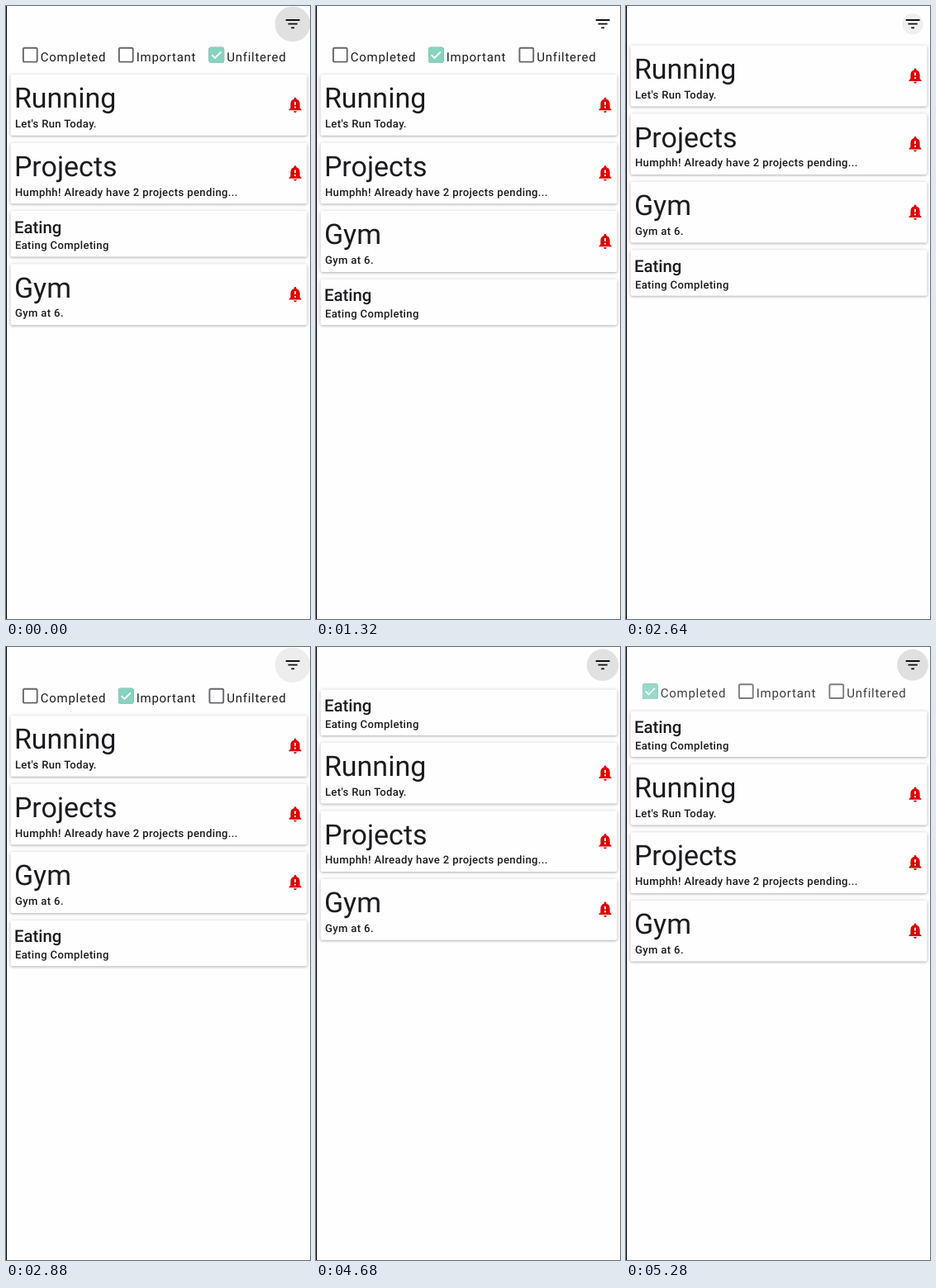
Write an HTML page that moves like this. It is 368 by 742 pixels and loops after 5.4 s.

```html
<!DOCTYPE html>
<html lang="en">
<head>
<meta charset="utf-8">
<title>Task list filters</title>
<style>
  html, body { margin: 0; width: 100%; height: 100%; overflow: hidden; background: #fefefe; }
  svg { display: block; }
  text { font-family: Roboto, sans-serif; fill: #1c1b1f; text-rendering: geometricPrecision; }
  .title { font-size: 34px; }
  .done { font-size: 20.4px; font-weight: 500; }
  .note { font-size: 13.1px; font-weight: 500; letter-spacing: .36px; }
  .option { font-size: 15px; letter-spacing: .74px; }
  .card { fill: #fefefe; filter: drop-shadow(0 1px 1.5px rgba(0,0,0,.27)) drop-shadow(0 0 2.5px rgba(0,0,0,.09)); }
  .bell { fill: #dc0000; }
  .box { fill: none; stroke: #67666a; stroke-width: 1.9; }
  .fill { fill: #86d3c0; }
  .tick { fill: none; stroke: #fff; stroke-width: 1.9; }
</style>
</head>
<body>
<svg id="stage" width="368" height="742" viewBox="0 0 368 742">
  <defs>
    <clipPath id="rowClip"><rect x="0" y="44" width="368" height="36"/></clipPath>
    <clipPath id="listClip"><rect x="1" y="79" width="367" height="311.3"/></clipPath>
  </defs>
  <rect width="368" height="742" fill="#fefefe"/>
  <g clip-path="url(#rowClip)"><g id="row"></g></g>
  <g id="list" clip-path="url(#listClip)"></g>
  <path transform="translate(335.9 10.4) scale(.9375)" fill="#111"
    d="M10 18h4v-2h-4zM3 6v2h18V6zM6 13h12v-2H6z"/>
  <g id="ripples"></g>
  <rect width="1" height="742"/>
</svg>
<script>
const LOOP = 5400, STEP = 120, ROW_HEIGHT = 35.3;
const PICK_IMPORTANT = 1000, PICK_COMPLETED = 3760;
const BELL = 'M18 16v-5c0-3.07-1.64-5.64-4.5-6.32V4c0-.83-.67-1.5-1.5-1.5s-1.5.67-1.5 1.5v.68C7.63 5.36 6 7.92 6 11v5l-2 2v1h16v-1zm-5 0h-2v-2h2zm0-4h-2V8h2zm-1 10c1.1 0 2-.9 2-2h-4c0 1.1.89 2 2 2z';

const byId = id => document.getElementById(id);
const clamp = v => Math.min(1, Math.max(0, v));
const smooth = u => u * u * (3 - 2 * u);

function add(parent, tag, attrs, text) {
  const el = document.createElementNS(parent.namespaceURI, tag);
  for (const key in attrs) el.setAttribute(key, attrs[key]);
  if (text) el.textContent = text;
  return parent.appendChild(el);
}

function makeCard(title, note, done) {
  const height = done ? 55.5 : 73.8;
  const el = add(byId('list'), 'g');
  add(el, 'rect', { class: 'card', x: 5.5, y: 0, width: 359, height, rx: 2 });
  add(el, 'text', { class: done ? 'done' : 'title', x: 9.9, y: done ? 26.6 : 40.3 }, title);
  add(el, 'text', { class: 'note', x: 10.9, y: done ? 46.2 : 64 }, note);
  if (!done) add(el, 'path', { class: 'bell', d: BELL, transform: 'translate(338.8 25.4) scale(.9375)' });
  return { el, pitch: height + 8.75 };
}

function makeOption(label, x) {
  const el = add(byId('row'), 'g', { transform: `translate(${x} 59.2)` });
  add(el, 'rect', { class: 'box', x: -8.4, y: -8.4, width: 16.8, height: 16.8, rx: 1.6 });
  const mark = add(el, 'g');
  add(mark, 'rect', { class: 'fill', x: -9.35, y: -9.35, width: 18.7, height: 18.7, rx: 2 });
  add(mark, 'path', { class: 'tick', d: 'M-5.6 0L-1.9 3.7L5.6 -3.7' });
  add(el, 'text', { class: 'option', x: 12.4, y: 7.7 }, label);
  return mark;
}

const running = makeCard('Running', "Let's Run Today.");
const projects = makeCard('Projects', 'Humphh! Already have 2 projects pending...');
const eating = makeCard('Eating', 'Eating Completing', true);
const gym = makeCard('Gym', 'Gym at 6.');

const completed = makeOption('Completed', 29.3);
const important = makeOption('Important', 145.3);
const unfiltered = makeOption('Unfiltered', 254.8);

// Spring moves of the filter row; closed is the value it settles at.
const moves = [
  { start: 1730, speed: 20, closed: 1 },
  { start: 2645, speed: 32, closed: 0 },
  { start: 4490, speed: 20, closed: 1 },
  { start: 5115, speed: 20, closed: 0 },
];

const ripple = (x, y, start, grow, release) =>
  ({ start, grow, release, el: add(byId('ripples'), 'circle', { cx: x, cy: y }) });
const ripples = [
  ripple(145.3, 59.2, 840, 450, 1080),
  ripple(347, 21.8, 1740, 200, 1780),
  ripple(347, 21.8, 2600, 225, 2775),
  ripple(29.3, 59.2, 3600, 450, 3840),
  ripple(347, 21.8, 4430, 360, 4670),
  ripple(347, 21.8, 5040, 360, 5430),
];

function closedAmount(t) {
  const move = moves.filter(m => m.start <= t).pop();
  if (!move) return 0;
  const x = (t - move.start) / 1000 * move.speed;
  const left = (1 + x) * Math.exp(-x);
  return Math.abs(move.closed - (left < .025 ? 0 : left));
}

function drawRipple({ el, start, grow, release }, t) {
  const age = (t < 400 ? t + LOOP : t) - start;
  const fade = 1 - clamp((age + start - release) / 240);
  el.setAttribute('r', 12 + 9.4 * smooth(clamp(age / grow)));
  el.setAttribute('opacity', age < 0 ? 0 : .118 * clamp(.3 + age / 200) * fade);
}

function cardOrder(t) {
  if (t >= PICK_COMPLETED) return [eating, running, projects, gym];
  if (t >= PICK_IMPORTANT) return [running, projects, gym, eating];
  return [running, projects, eating, gym];
}

function draw(t) {
  const closed = closedAmount(t);
  const shift = `translate(0 ${-closed * ROW_HEIGHT})`;
  byId('row').setAttribute('transform', shift);
  byId('row').setAttribute('opacity', 1 - closed);
  byId('list').setAttribute('transform', shift);

  const toImportant = clamp((t - PICK_IMPORTANT) / 88);
  const toCompleted = clamp((t - PICK_COMPLETED) / 88);
  unfiltered.setAttribute('opacity', 1 - toImportant);
  important.setAttribute('opacity', toImportant - toCompleted);
  completed.setAttribute('opacity', toCompleted);

  let y = 83;
  for (const card of cardOrder(t)) {
    card.el.setAttribute('transform', `translate(0 ${y})`);
    y += card.pitch;
  }
  ripples.forEach(r => drawRipple(r, t));
}

const begin = performance.now();
function tick() {
  const t = (performance.now() - begin) % LOOP;
  draw(Math.floor(t / STEP) * STEP);
  requestAnimationFrame(tick);
}
tick();
</script>
</body>
</html>
```
